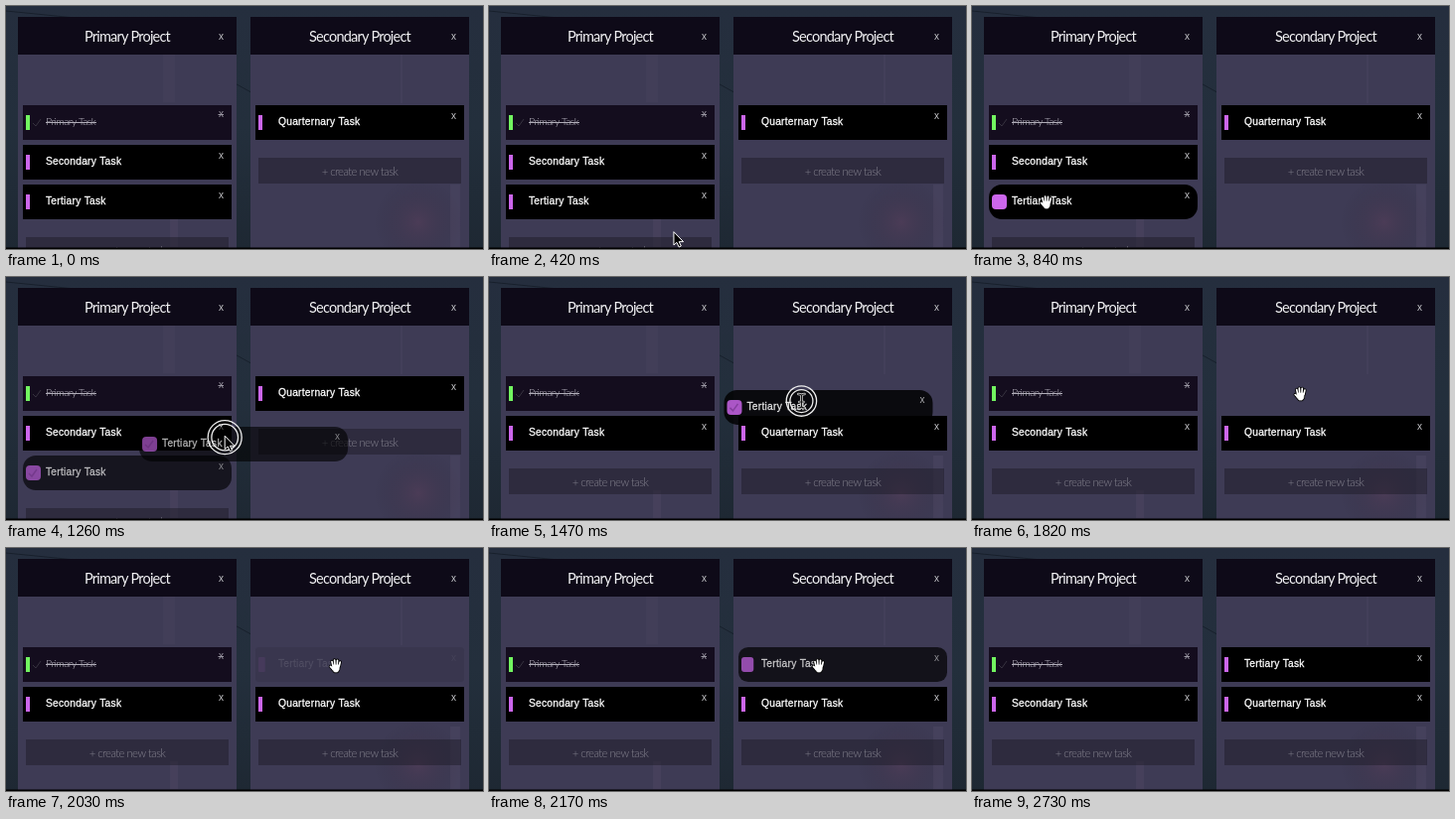
These frames come from a looping animation (480x245 px, 2.87 s). An HTML page with a canvas:

```html
<!DOCTYPE html>
<html lang="en">
<head>
<meta charset="utf-8">
<title>Task board</title>
<style>
html, body { margin: 0; width: 100%; height: 100%; overflow: hidden; background: #000; }
canvas { display: block; }
</style>
</head>
<body>
<canvas id="stage" width="480" height="245"></canvas>
<script>
const ctx = document.getElementById('stage').getContext('2d');
const LOOP = 2870, STEP = 70;
const LEFT = 12, RIGHT = 246;
const ENTER = 350, GRAB = 1120, REFLOW = 1400, ARRIVE = 1610, DROP = 1820, LEAVE = 2240, EXIT = 2700;
const SANS = '"Liberation Sans", Arial, sans-serif', THIN = 'Lato, sans-serif';

const start = { x: 250, y: 240 }, grabbed = { x: 75, y: 197 };
const dropped = { x: 324, y: 115 }, rest = { x: 332, y: 118 }, end = { x: 362, y: 202 };

const rowY = row => 100 + 40 * row;
const lerp = (a, b, k) => a + (b - a) * k;
const ramp = (t, from, to) => Math.min(1, Math.max(0, (t - from) / (to - from)));
const easeOut = (k, power) => 1 - (1 - k) ** power;

// Eased move along a bowed path: x settles earlier than y.
function glide(k, from, to, power) {
  return {
    x: lerp(from.x, to.x, easeOut(k, power)),
    y: lerp(from.y, to.y, easeOut(k, power / 1.55))
  };
}

function cursorAt(t) {
  if (t < GRAB) return glide(ramp(t, ENTER, 770), start, grabbed, 2.5);
  if (t < ARRIVE) return glide(ramp(t, GRAB, ARRIVE), grabbed, dropped, 2.6);
  if (t < LEAVE) return glide(ramp(t, ARRIVE, 1960), dropped, rest, 2);
  return glide(ramp(t, LEAVE, EXIT), rest, end, 1.5);
}

function ghostAt(t) {
  const ghost = glide(ramp(t, GRAB, ARRIVE), { x: 17, y: 180 }, { x: 256, y: 97.5 }, 2);
  ghost.x += 12 * ramp(t, ARRIVE, 1750);
  return ghost;
}

function box(x, y, w, h, color, r = 0) {
  ctx.fillStyle = color;
  ctx.beginPath();
  ctx.roundRect(x, y, w, h, r);
  ctx.fill();
}

function line(color, width, ...points) {
  ctx.strokeStyle = color;
  ctx.lineWidth = width;
  ctx.beginPath();
  points.forEach(p => ctx.lineTo(...p));
  ctx.stroke();
}

function text(str, x, y, font, spacing, color, align = 'left') {
  ctx.font = font;
  ctx.letterSpacing = spacing + 'px';
  ctx.textAlign = align;
  ctx.fillStyle = color;
  ctx.fillText(str, x, y);
}

function closeMark(x, y, color = '#c8c8cc') {
  text('x', x, y, '10px ' + SANS, 0, color, 'center');
}

function checkMark(x, y, color, width) {
  line(color, width, [x, y], [x + 3, y + 3], [x + 8, y - 4]);
}

function glow(x, y, r, color) {
  const g = ctx.createRadialGradient(x, y, 0, x, y, r);
  g.addColorStop(0, color);
  g.addColorStop(1, 'transparent');
  ctx.fillStyle = g;
  ctx.fillRect(x - r, y - r, 2 * r, 2 * r);
}

function backdrop() {
  const g = ctx.createLinearGradient(0, 0, 0, 245);
  g.addColorStop(0, '#252e3e');
  g.addColorStop(.5, '#232f3c');
  g.addColorStop(1, '#1e2833');
  ctx.fillStyle = g;
  ctx.fillRect(0, 0, 480, 245);
  line('#18202c', 1, [0, 5], [70, 12]);
  line('#18202c', 1, [225, 75], [252, 90]);
}

function column(x, title) {
  box(x, 11, 220, 233, '#3e3b55');
  if (x === LEFT) {
    box(158, 49, 12, 48, 'rgba(100,90,120,.1)');
    box(165, 215, 8, 28, 'rgba(140,110,150,.1)');
  } else {
    glow(415, 218, 45, 'rgba(140,65,95,.17)');
    box(447, 180, 10, 63, 'rgba(120,105,140,.12)');
    line('rgba(110,100,130,.25)', 1, [398, 49], [398, 98]);
  }
  box(x, 11, 220, 38, '#0e0a18');
  text(title, x + 110, 35.5, '14.5px ' + THIN, -.8, '#f2f2f4', 'center');
  closeMark(x + 204.5, 33.5);
}

function createButton(x, y) {
  box(x + 8, y, 204, 26, 'rgba(30,28,40,.5)');
  text('+ create new task', x + 110, y + 18, '300 11.3px ' + THIN, -.55, '#85838f', 'center');
}

function task(x, y, name, { hover = 0, alpha = 1, check = false } = {}) {
  ctx.save();
  ctx.globalAlpha = alpha;
  box(x, y, 210, 35, '#000', 13 * hover);
  box(x + 3, y + 10, 4 + 11 * hover, 15, '#cc66ec', 4 * hover);
  if (check) checkMark(x + 6, y + 18, 'rgba(70,25,90,.45)', 1.5);
  text(name, x + 23, y + 20, '10.2px ' + SANS, .27, '#fff');
  ctx.strokeStyle = '#fff';
  ctx.lineWidth = .3;
  ctx.strokeText(name, x + 23, y + 20);
  closeMark(x + 199.5, y + 13.5);
  ctx.restore();
}

function doneTask(x, y) {
  box(x, y, 210, 35, '#140d1e');
  box(x + 3, y + 10, 4, 15, '#72f560');
  checkMark(x + 10, y + 18, '#36323f', 1);
  text('Primary Task', x + 23, y + 20, '300 10.5px ' + THIN, -.55, '#c0bdc8');
  line('#b0adb8', 1, [x + 23, y + 17.5], [x + 74, y + 17.5]);
  closeMark(x + 199.5, y + 12, '#9a97a2');
  line('#9a97a2', 1, [x + 196.5, y + 9.5], [x + 202, y + 9.5]);
}

function hand() {
  const palm = new Path2D('M-3 0L3.5 0L3 5L1.5 7L-1.5 7L-4 4Z');
  const fingers = new Path2D('M-3 1L-4 -3.5M-1 1L-1.4 -5M1.2 1L1.5 -4.7M3.3 1L4.2 -3M-2.5 4L-5.5 1.5');
  for (const [color, width] of [['#000', 3.4], ['#fff', 1.7]]) {
    ctx.strokeStyle = ctx.fillStyle = color;
    ctx.lineWidth = width;
    ctx.stroke(fingers);
    ctx.lineWidth = width - 1;
    ctx.stroke(palm);
    ctx.fill(palm);
  }
}

function arrow() {
  const shape = new Path2D('M0 -1L0 12L3 9.3L5.2 14L7.4 13L5.3 8.6L9.3 8.6Z');
  ctx.fillStyle = '#000';
  ctx.fill(shape);
  ctx.strokeStyle = '#fff';
  ctx.lineWidth = 1;
  ctx.stroke(shape);
}

function textCursor() {
  const shape = new Path2D('M-3 -7Q0 -7 0 -5Q0 -7 3 -7M0 -5V5M-3 7Q0 7 0 5Q0 7 3 7M-2 1H2');
  for (const [color, width] of [['#ddd', 2.6], ['#111', 1.1]]) {
    ctx.strokeStyle = color;
    ctx.lineWidth = width;
    ctx.stroke(shape);
  }
}

function pressRings(t) {
  const outer = lerp(17, 14, ramp(t, 1260, ARRIVE));
  ctx.strokeStyle = '#eee';
  ctx.lineWidth = 1.3;
  for (const r of [outer, outer - 3.7]) {
    ctx.beginPath();
    ctx.arc(0, 0, r, 0, 7);
    ctx.stroke();
  }
}

function cursor(t, dragging) {
  if (t < ENTER || t >= EXIT) return;
  const { x, y } = cursorAt(t);
  ctx.save();
  ctx.translate(x, y);
  ctx.lineCap = ctx.lineJoin = 'round';
  if (dragging) pressRings(t);
  if (dragging && t > REFLOW) textCursor();
  else if (dragging || t < 560 || t > 2520) arrow();
  else hand();
  ctx.restore();
}

function draw(t) {
  const moved = t >= REFLOW;
  const dragging = t > GRAB && t < DROP;
  backdrop();
  column(LEFT, 'Primary Project');
  column(RIGHT, 'Secondary Project');
  createButton(LEFT, moved ? 193 : 233);
  createButton(RIGHT, moved ? 193 : 153);

  doneTask(LEFT + 5, rowY(0));
  task(LEFT + 5, rowY(1), 'Secondary Task');
  task(RIGHT + 5, rowY(moved ? 1 : 0), 'Quarternary Task');
  if (!moved) task(LEFT + 5, rowY(2), 'Tertiary Task', {
    hover: ramp(t, 560, 770),
    alpha: lerp(1, .64, ramp(t, GRAB, 1260)),
    check: dragging
  });
  if (t >= DROP) task(RIGHT + 5, rowY(0), 'Tertiary Task', {
    hover: ramp(t, 1960, LEAVE) - ramp(t, 2380, 2590),
    alpha: ramp(t, 2010, LEAVE)
  });
  if (dragging) {
    const { x, y } = ghostAt(t);
    task(x, y, 'Tertiary Task', { hover: 1, alpha: lerp(.62, .98, ramp(t, 1260, ARRIVE)), check: true });
  }
  box(0, 243.5, 480, 2, '#000');
  cursor(t, dragging);
}

function frame() {
  draw(Math.floor(performance.now() % LOOP / STEP) * STEP);
  requestAnimationFrame(frame);
}
frame();
</script>
</body>
</html>
```
